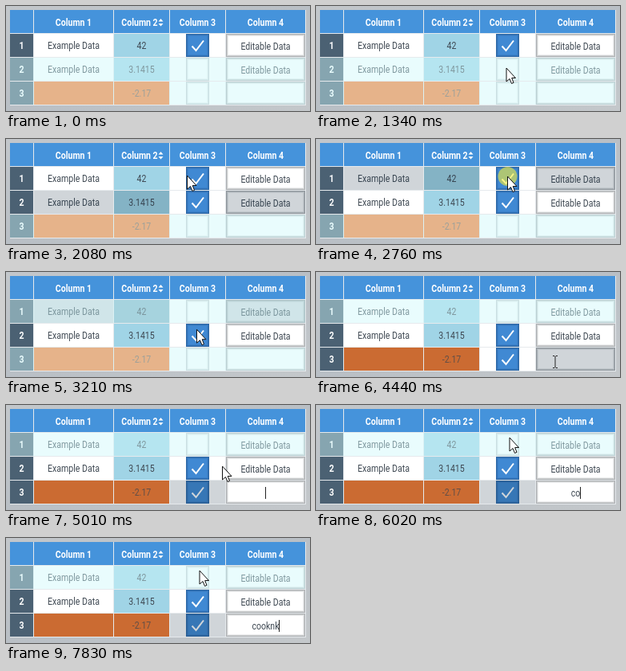
Animation of 380x132 px, one loop 8 s. Source, as an HTML page:

```html
<!DOCTYPE html>
<html lang="en">
<head>
<meta charset="utf-8">
<title>Editable table</title>
<style>
html, body { margin: 0; width: 100%; height: 100%; overflow: hidden; background: #bfc4c9; }
svg { display: block; width: 380px; height: 132px; }
text { font: 12px Roboto, "Liberation Sans", sans-serif; text-anchor: middle; fill: #3f4953; }
.bold { font-weight: 700; fill: #fff; }
</style>
</head>
<body>
<svg id="stage" viewBox="0 0 380 132">
  <defs>
    <linearGradient id="back" x2="1" y2="1">
      <stop offset="0" stop-color="#c3c7cb"/>
      <stop offset=".5" stop-color="#b9bfc5"/>
      <stop offset="1" stop-color="#c4c8cb"/>
    </linearGradient>
  </defs>
  <rect width="380" height="132" fill="url(#back)"/>
  <rect x="5" y="5" width="370" height="120" fill="#e6eaed"/>
</svg>
<script>
const LOOP = 8000;
const STEP = 70;
const CONDENSE = 0.88;
const CELL = 29;
const PITCH = CELL + 1;
const stage = document.getElementById('stage');
const columns = [5, 35, 135, 205, 275].map((x, i, all) => ({ x, width: (all[i + 1] || 375) - x - 1 }));

// Times at which each row is enabled and hovered
const rowData = [
  { text: 'Example Data', value: '42', entry: 'Editable Data', on: [0, 2890], hover: [2620, 3490] },
  { text: 'Example Data', value: '3.1415', entry: 'Editable Data', on: [1680, LOOP], hover: [1540, 2620] },
  { text: '', value: '-2.17', entry: '', on: [3760, LOOP], hover: [3490, LOOP], alert: '#f87a2e' }
];

const home = { x: 260, y: 111 };
const moves = [
  { from: 590, to: 1340, x: 238, y: 78 },
  { from: 1870, to: 2080, x: 226.5, y: 46 },
  { from: 2080, to: 2360, x: 239.5, y: 47 },
  { from: 2890, to: 3490, x: 237, y: 108 },
  { from: 3950, to: 4440, x: 299, y: 113 },
  { from: 4800, to: 5220, x: 242, y: 41 }
];
const clicks = [[1540, 1680], [2620, 2890], [3560, 3760], [4660, 4870]];
const editStart = 4660;
const word = 'cooknk';
const keyTimes = [5750, 6020, 6170, 6440, 7230, 7760];
const caretBlink = [6970, 7230];

function add(tag, attrs, parent = stage) {
  const node = document.createElementNS('http://www.w3.org/2000/svg', tag);
  set(node, attrs);
  return parent.appendChild(node);
}

function set(node, attrs) {
  for (const key in attrs) node.setAttribute(key, attrs[key]);
}

function box(x, y, width, height, attrs) {
  return add('rect', { x, y, width, height, ...attrs });
}

function label(text, x, y, attrs = {}) {
  const node = add('text', { transform: `translate(${x} ${y}) scale(${CONDENSE} 1)`, ...attrs });
  node.textContent = text;
  return node;
}

function insetEdge(x, y, width, stroke) {
  const group = add('g', { fill: 'none', stroke });
  for (let d = .5; d < 3; d++) {
    add('rect', {
      x: x + d, y: y + d, width: width - 2 * d, height: CELL - 2 * d,
      'stroke-opacity': .68 - .22 * d
    }, group);
  }
  return group;
}

const within = (t, [from, to]) => t >= from && t < to;
const show = (node, visible) => set(node, { visibility: visible ? 'visible' : 'hidden' });
const ease = p => (1 - Math.cos(Math.PI * p)) / 2;

columns.forEach(({ x, width }, i) => {
  box(x, 5, width, CELL, { fill: '#4593db' });
  if (i) label('Column ' + i, i === 2 ? 167 : x + width / 2, 25, { class: 'bold' });
});
add('path', { d: 'M190.500 19.500l3-3.500 3 3.500ZM190.500 22h6l-3 3.500Z', fill: '#fff' });

const rows = rowData.map((data, i) => {
  const y = 35 + PITCH * i;
  const main = data.alert || '#fff';
  const fills = ['#4b6173', main, data.alert || '#a0d4e6', '#fff', '#fff'];
  columns.forEach(({ x, width }, c) => box(x, y, width, CELL, { fill: fills[c] }));

  insetEdge(225, y, CELL, '#9aa3a8');
  const check = add('g', {});
  check.append(
    box(225, y, CELL, CELL, { fill: '#4089d3' }),
    insetEdge(225, y, CELL, '#1f4f85'),
    add('path', { d: `M232.500 ${y + 15.5}l5 5.500 9.500-12.500`, fill: 'none', stroke: '#fff', 'stroke-width': 2 })
  );
  insetEdge(275, y, 99, '#6f757a');

  label(i + 1, 19.5, y + 19, { class: 'bold' });
  label(data.text, 84.5, y + 19);
  label(data.value, 169.5, y + 19, { opacity: data.alert ? .7 : 1 });
  label(data.entry, 324.5, y + 20);

  // Translucent layers for the hovered and the disabled look
  const shades = columns.slice(1).map(({ x, width }) => box(x, y, width, CELL, { fill: '#142d41', opacity: .2 }));
  const veil = box(5, y, 369, CELL, { fill: '#cef8fa', opacity: .45 });
  return { ...data, check, shades, veil };
});

const typed = label('', 324.5, 115);
const caret = box(324, 103, 1, 15, { fill: '#222' });
const halo = add('circle', { r: 12, fill: '#f6ee36' });
const arrow = add('path', {
  d: 'M0 0V17L4 13.500 6.500 19.500 9 18.400 6.700 12.500H11.500Z',
  fill: '#fff', stroke: '#111'
});
const beam = add('path', {
  d: 'M-3-7.500H-1L0-6.500 1-7.500H3M0-6.500V6.500M-3 7.500H-1L0 6.500 1 7.500H3',
  fill: 'none', stroke: '#222'
});

function drawRow(row, t) {
  const on = within(t, row.on);
  const activeCell = t < editStart ? 3 : 4;
  show(row.check, on);
  show(row.veil, !on);
  row.shades.forEach((shade, i) => show(shade, within(t, row.hover) && i + 1 !== activeCell));
}

function drawTyping(t) {
  typed.textContent = word.slice(0, keyTimes.filter(time => time <= t).length);
  const half = typed.textContent ? typed.getComputedTextLength() * CONDENSE / 2 : 0;
  set(caret, { x: Math.round(324.4 + half) });
  show(caret, t >= editStart && !within(t, caretBlink));
}

// The pointer advances in equal time steps along eased straight paths
function pointerAt(t) {
  let { x, y } = home;
  for (const move of moves) {
    if (t < move.from) break;
    const span = move.to - move.from;
    const count = Math.round(span / STEP);
    const p = ease(Math.min(1, Math.floor((t - move.from) / span * count + .01) / count));
    x += (move.x - x) * p;
    y += (move.y - y) * p;
  }
  return { x, y };
}

function drawPointer(t) {
  const { x, y } = pointerAt(t);
  const started = t >= moves[0].from;
  const overEntry = x > 275 && y > 95;
  const transform = `translate(${x} ${y})`;
  set(arrow, { transform });
  set(beam, { transform });
  show(arrow, started && !overEntry);
  show(beam, started && overEntry);

  const click = clicks.find(span => within(t, span));
  show(halo, click);
  if (click) set(halo, { transform, opacity: 1 - (t - click[0]) / 350 });
}

function draw(t) {
  rows.forEach(row => drawRow(row, t));
  drawTyping(t);
  drawPointer(t);
}

const begin = performance.now();
function tick() {
  draw(Math.max(0, performance.now() - begin) % LOOP);
  requestAnimationFrame(tick);
}
tick();
</script>
</body>
</html>
```
